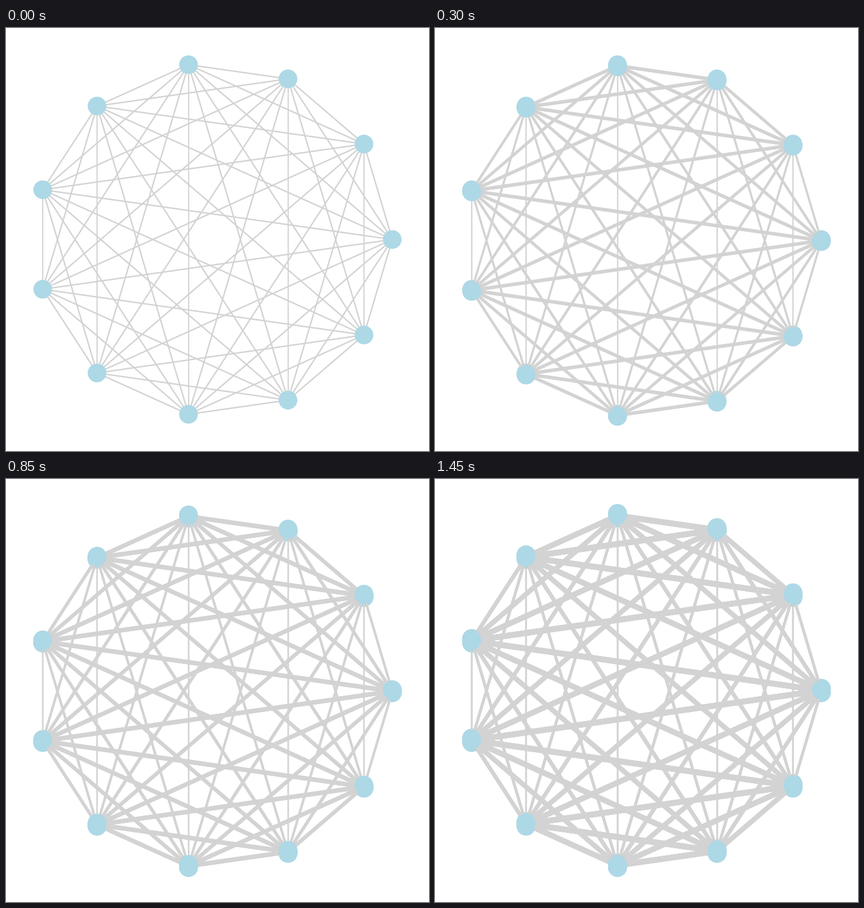
Animation of 748x748 px, one loop 1500 ms. Source, as a matplotlib script:

```python
from itertools import combinations

import matplotlib.pyplot as plt
import numpy as np
from matplotlib.animation import FuncAnimation
from matplotlib.collections import LineCollection, PatchCollection
from matplotlib.patches import Circle

SIZE, DPI = 748, 100
FRAMES, INTERVAL = 30, 50
NODES = 11
RADIUS = 16.5
SWING = 3.9  # vertical travel in pixels, each way
SLANTED, UPRIGHT = 2.5, 2.05  # edge widths in pixels


def fit(values):
    """Scale values so they span the stage with its margins."""
    lo, hi = values.min(), values.max()
    return SIZE / 2 + (values - (lo + hi) / 2) * SIZE / 1.21 / (hi - lo)


theta = 2 * np.pi * np.arange(NODES) / NODES
points = np.column_stack([fit(np.cos(theta)), fit(-np.sin(theta))])
pairs = list(combinations(range(NODES), 2))
widths = [(SLANTED if (a + b) % NODES else UPRIGHT) * 72 / DPI
          for a, b in pairs]

fig = plt.figure(figsize=(SIZE / DPI, SIZE / DPI), dpi=DPI, facecolor="white")
ax = fig.add_axes([0, 0, 1, 1])
ax.set(xlim=(0, SIZE), ylim=(SIZE, 0))
ax.axis("off")


def add_layer(step):
    """One copy of the graph, painted over all earlier copies."""
    pos = points + [0, SWING * np.sin(2 * np.pi * step / FRAMES)]
    edges = LineCollection([pos[[a, b]] for a, b in pairs], colors="lightgray",
                           linewidths=widths, zorder=2 * step + 1)
    nodes = PatchCollection([Circle(p, RADIUS) for p in pos],
                            facecolor="lightblue", linewidth=0,
                            zorder=2 * step + 2)
    for artist in (edges, nodes):
        ax.add_collection(artist, autolim=False)
    return edges, nodes


layers = [add_layer(step) for step in range(FRAMES)]


def update(frame):
    for step, layer in enumerate(layers):
        for artist in layer:
            artist.set_visible(step <= frame)
    return [artist for layer in layers for artist in layer]


anim = FuncAnimation(fig, update, frames=FRAMES, interval=INTERVAL,
                     init_func=lambda: update(0), repeat=True, repeat_delay=0)
plt.show()
```
